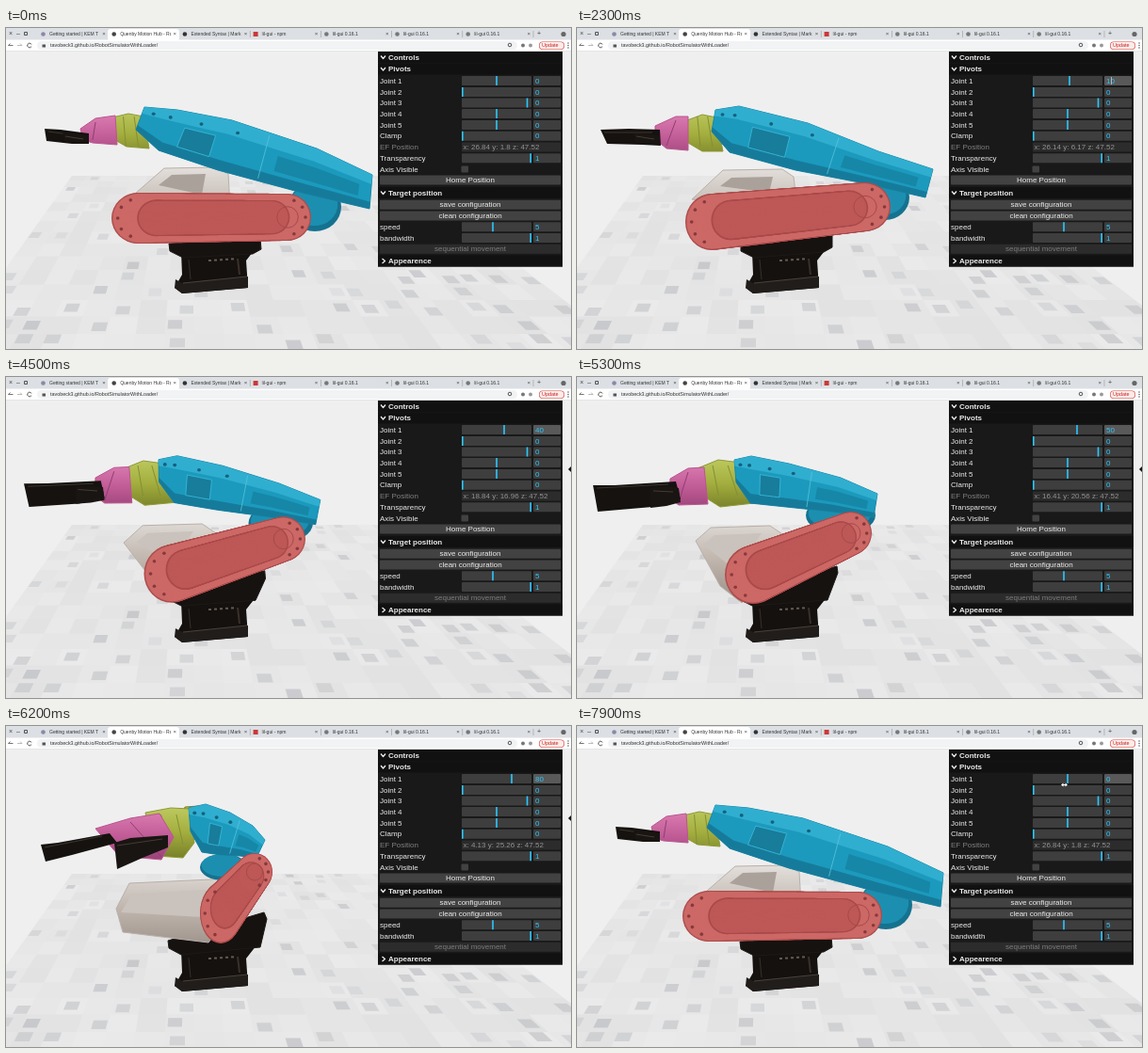
An HTML page with a canvas for the animation above (8 s loop, 600x341 px).

```html
<!DOCTYPE html>
<html lang="en">
<head>
<meta charset="utf-8">
<title>Robot arm simulator</title>
<style>
html, body { margin: 0; width: 100%; height: 100%; overflow: hidden; background: #efefef; }
canvas { display: block; }
</style>
</head>
<body>
<canvas id="stage" width="600" height="341"></canvas>
<script>
const c = document.getElementById('stage').getContext('2d');
const LOOP = 8000, CYAN = '#2cc9ff';

// joint angle over time: [ms, degrees]
const STEPS = [[0, 0], [1900, 10], [4100, 20], [4300, 30], [4500, 40], [4700, 50],
  [5400, 60], [5500, 70], [5600, 80], [7200, 0]];

// every part is given at these joint angles and blended between them
const ANGLES = [0, 10, 50, 80];
const POSES = {
  effector: [[26.84, 1.8], [26.14, 6.17], [16.41, 20.56], [4.13, 25.26]],
  turntable: [
    [173,229, 270,224, 271,235, 262,240, 188,244, 174,237],
    [174,227, 271,220, 271,233, 262,238, 188,244, 174,237],
    [174,228, 276,201, 277,208, 266,237, 186,243, 174,237],
    [172,228, 274,198, 277,205, 270,235, 186,243, 173,236]],
  motor: [
    [130,182, 168,149, 222,148, 236,155, 238,190, 180,190],
    [122,182, 155,151, 218,150, 230,158, 234,190, 160,190],
    [126,174, 142,160, 205,158, 230,175, 175,240, 152,222],
    [117,194, 131,167, 240,162, 245,190, 215,230, 124,219]],
  pocket: [
    [162,167, 176,156, 212,155, 208,177],
    [152,168, 164,159, 208,158, 204,175],
    [134,178, 146,168, 196,166, 168,205],
    [122,198, 134,178, 215,174, 208,203]],
  elbow: [[328,190,28,26], [327,180,26,24], [280,147,37,20], [231,150,25,14]],
  arm: [
    [147,84, 182,87, 240,98, 330,128, 389,156, 386,192, 318,176, 225,151, 162,130, 138,108],
    [147,87, 172,83, 245,101, 320,131, 378,150, 370,180, 305,165, 232,151, 162,132, 143,110],
    [167,88, 185,84, 225,92, 280,107, 319,124, 315,149, 270,143, 222,138, 184,134, 169,112],
    [194,87, 212,83, 238,92, 262,106, 275,121, 266,140, 248,138, 228,137, 208,134, 196,112]],
  link: [
    [140,202,28,27, 299,201,25,25],
    [143,206,28,30, 306,190,27,26],
    [187,210,30,31, 291,166,22,23],
    [228,199,22,32, 264,155,19,20]],
  wrist: [
    [113,95, 130,91, 146,94, 152,128, 128,126, 114,118],
    [117,98, 133,92, 148,95, 155,131, 133,131, 118,122],
    [128,97, 150,88, 174,91, 188,134, 152,138, 130,124],
    [148,92, 175,87, 195,88, 200,124, 188,140, 160,138]],
  collar: [
    [180,95, 196,91, 211,96, 208,101],
    [190,96, 198,91, 212,97, 209,103],
    [165,98, 172,87, 186,88, 183,96],
    [186,96, 190,86, 204,85, 200,96]],
  hand: [
    [79,107, 95,96, 116,93, 118,124, 92,122, 82,119],
    [83,104, 105,94, 118,94, 118,130, 95,128, 83,118],
    [99,108, 118,97, 135,96, 139,135, 108,136, 98,129],
    [95,109, 132,98, 163,93, 178,118, 165,142, 120,138]],
  finger: [
    [41,107, 58,108, 88,112, 88,123, 70,123, 43,120],
    [25,108, 55,107, 88,108, 89,125, 70,124, 32,123],
    [17,115, 40,115, 105,111, 110,130, 80,138, 22,143],
    [37,126, 55,124, 110,114, 118,124, 70,137, 42,144]],
  thumb: [
    [60,112, 70,112, 88,114, 88,122, 75,122, 62,121],
    [60,112, 70,112, 88,114, 88,124, 75,123, 62,122],
    [78,118, 95,116, 108,118, 110,133, 95,137, 78,139],
    [115,124, 132,119, 172,116, 172,129, 145,140, 118,152]]
};

const lerp = (a, b, k) => a + (b - a) * k;

function blend(keys, angle) {
  let i = 0;
  while (i < ANGLES.length - 2 && angle > ANGLES[i + 1]) i++;
  const k = (angle - ANGLES[i]) / (ANGLES[i + 1] - ANGLES[i]);
  return keys[i].map((v, n) => lerp(v, keys[i + 1][n], k));
}

function rect(x, y, w, h, fill, r = 0) {
  c.fillStyle = fill;
  c.beginPath();
  c.roundRect(x, y, w, h, r);
  c.fill();
}

function oval(x, y, rx, ry, fill) {
  c.fillStyle = fill;
  c.beginPath();
  c.ellipse(x, y, rx, ry, 0, 0, 7);
  c.fill();
}

function shape(p, fill, edge) {
  c.beginPath();
  for (let i = 0; i < p.length; i += 2) c.lineTo(p[i], p[i + 1]);
  c.closePath();
  c.fillStyle = fill;
  c.fill();
  if (edge) {
    c.strokeStyle = edge;
    c.stroke();
  }
}

function line(p, color, width = 1) {
  c.beginPath();
  for (let i = 0; i < p.length; i += 2) c.lineTo(p[i], p[i + 1]);
  c.strokeStyle = color;
  c.lineWidth = width;
  c.stroke();
  c.lineWidth = 1;
}

function text(s, x, y, size, fill, style = '', align = 'left') {
  c.font = `${style} ${size}px "Liberation Sans", Arial, sans-serif`;
  c.textAlign = align;
  c.textBaseline = 'middle';
  c.fillStyle = fill;
  c.fillText(s, x, y);
}

function gradient(y0, y1, ...colors) {
  const g = c.createLinearGradient(0, y0, 0, y1);
  colors.forEach((col, i) => g.addColorStop(i / (colors.length - 1), col));
  return g;
}

function floor() {
  rect(0, 25, 600, 316, '#efefef');
  let seed = 7;
  const rnd = () => (seed = seed * 16807 % 2147483647) / 2147483647;
  const cols = 22, rowY = i => 157 + 5 * i + 0.5 * i * i;
  const at = (u, y) => lerp(70 - 0.716 * (y - 157), 420 + 1.3 * (y - 157), u / cols);
  for (let r = 0; r < 15; r++) {
    for (let i = 0; i < cols; i++) {
      const tile = (a, b, d, e, fill) => {
        const y0 = rowY(r + d), y1 = rowY(r + e);
        shape([at(i + a, y0), y0, at(i + b, y0), y0, at(i + b, y1), y1, at(i + a, y1), y1], fill);
      };
      const v = 226 + rnd() * 9 | 0;
      tile(0, 1.03, 0, 1.05, `rgb(${v},${v},${v + 1})`);
      if (rnd() < 0.3) {
        const a = rnd() * 0.5, d = rnd() * 0.5;
        tile(a, a + 0.5, d, d + 0.5, `rgba(150,152,158,${0.1 + rnd() * 0.25})`);
      }
    }
  }
}

function robot(angle) {
  const p = {};
  for (const name in POSES) p[name] = blend(POSES[name], angle);
  c.lineJoin = 'round';

  // pedestal
  shape([186,238, 266,233, 255,247, 257,276, 187,282, 179,276, 187,262], '#14110f');
  shape([180,267, 187,271, 257,264, 257,276, 187,282, 179,276], '#211d1a');
  line([188,271, 256,264], '#4b4139');
  line([194,246, 196,267], '#383029');
  line([246,245, 248,262], '#3a302a', 2);
  shape(p.turntable, '#151210', '#1d1917');
  for (let i = 0; i < 5; i++) rect(215 + i * 6, 246 - i * 0.4, 3, 2, '#65594f');

  shape(p.motor, gradient(148, 232, '#e3dfdb', '#c3b9b1', '#a0958d'), '#b9b0a9');
  shape(p.pocket, angle < 30 ? '#aaa19b' : '#cac2bc');
  shape(p.collar, '#a7b244', '#7d8530');

  const [ex, ey, erx, ery] = p.elbow;
  oval(ex, ey, erx, ery, '#15728f');
  oval(ex - 1, ey - 2, erx * 0.9, ery * 0.85, '#1c8fb1');

  shape(p.wrist, gradient(88, 138, '#bcc85d', '#a3ae3e', '#7b842b'), '#8f9936');
  for (const k of [0.35, 0.7])
    line([lerp(p.wrist[0], p.wrist[4], k), 94, lerp(p.wrist[10], p.wrist[6], k), 126], '#848e35');

  // upper arm: u runs along it, v from top edge to bottom edge
  const arm = (u, v) => {
    const i = Math.min(3, Math.floor(u)), k = u - i, a = p.arm;
    const pt = n => lerp(lerp(a[2 * i + n], a[18 - 2 * i + n], v),
      lerp(a[2 * i + 2 + n], a[16 - 2 * i + n], v), k);
    return [pt(0), pt(1)];
  };
  const strip = (u0, u1, v0, v1, fill, edge) => {
    const q = [];
    for (let k = 0; k <= 8; k++) q.push(...arm(lerp(u0, u1, k / 8), v0));
    for (let k = 8; k >= 0; k--) q.push(...arm(lerp(u0, u1, k / 8), v1));
    shape(q, fill, edge);
  };
  shape(p.arm, '#1b9abd', '#1787a8');
  strip(0, 4, 0, 0.28, '#30aed0');
  strip(0, 4, 0.8, 1, '#167b9b');
  strip(1.25, 1.8, 0.36, 0.8, '#187c9b', '#36b3d2');
  strip(2.6, 3.8, 0.4, 0.72, '#1787a7');
  line([...arm(2.45, 0.05), ...arm(2.45, 0.95)], '#57c3dc', 0.8);
  for (const u of [0.35, 0.9, 1.5, 2.1]) oval(...arm(u, 0.2), 2, 1.8, '#14617c');

  shape(p.hand, gradient(94, 140, '#d978af', '#c05b96', '#9c4479'), '#b9568f');
  line([p.hand[2], p.hand[3] + 4, p.hand[8], p.hand[9] - 3], '#8f3f70');
  shape(p.finger, '#15120f');
  line([p.finger[0] + 4, p.finger[1] + 3, p.finger[4] - 8, p.finger[5] + 3], '#3c342d');
  shape(p.thumb, '#191512');
  line([p.thumb[0] + 3, p.thumb[1] + 3, p.thumb[4] - 6, p.thumb[5] + 4], '#463b32');

  // lower link
  const [x0, y0, a0, b0, x1, y1, a1, b1] = p.link;
  const capsule = (size, fill, from = 0, to = 1) => {
    for (let i = 0; i <= 100; i++) {
      const k = lerp(from, to, i / 100);
      oval(lerp(x0, x1, k), lerp(y0, y1, k), lerp(a0, a1, k) * size, lerp(b0, b1, k) * size, fill);
    }
  };
  capsule(1, '#ad4c4b');
  capsule(0.95, '#cc6866');
  capsule(0.72, '#a94a49', 0.12, 0.9);
  capsule(0.66, '#bd5857', 0.12, 0.9);
  for (const [x, y, a, b] of [[x0, y0, a0, b0], [x1, y1, a1, b1]]) {
    const dir = x === x0 ? Math.PI : 0;
    for (let i = -2; i <= 2; i++) {
      const t = dir + i * 0.6;
      oval(x + Math.cos(t) * a * 0.76, y + Math.sin(t) * b * 0.76, 1.8, 1.8, '#87393a');
    }
  }
  c.strokeStyle = '#a64a49';
  c.beginPath();
  c.ellipse(x1, y1, a1 * 0.45, b1 * 0.45, 0, 0, 7);
  c.stroke();
}

function browser() {
  rect(0, 0, 600, 13, '#dcdfe3');
  rect(0, 12.5, 600, 12.5, '#fff');
  text('×', 5, 6, 7, '#444', '', 'center');
  text('–', 13, 6, 7, '#444', '', 'center');
  c.strokeStyle = '#555';
  c.strokeRect(19.5, 4.5, 3, 3);
  rect(108, 1, 76, 13, '#fff', 3);
  const tabs = [['Getting started | KEM T', '#8d87a5'], ['Quenby Motion Hub - Ro', '#444'],
    ['Extended Syntax | Mark', '#333'], ['lil-gui - npm', '#cb3837'],
    ['lil-gui 0.16.1', '#777'], ['lil-gui 0.16.1', '#777'], ['lil-gui 0.16.1', '#777']];
  tabs.forEach(([name, color], i) => {
    const x = 46 + i * 75.2;
    if (i === 3) rect(x - 9, 4, 5, 5, color);
    else oval(x - 6.5, 6.5, 2.3, 2.3, color);
    c.save();
    c.beginPath();
    c.rect(x, 0, 54, 13);
    c.clip();
    text(name, x, 6.8, 5, '#333');
    c.restore();
    text('×', x + 58, 6.5, 6, '#444', '', 'center');
    if (i > 1) rect(x + 62.5, 3, 0.6, 7, '#999');
  });
  text('+', 566, 6.5, 7, '#444', '', 'center');
  oval(592, 6.5, 2.6, 2.6, '#666');
  line([7.5,18.5, 2.5,18.5, 4.5,16.5], '#555', 0.8);
  line([12,18.5, 17,18.5, 15,16.5], '#aaa', 0.8);
  c.strokeStyle = '#555';
  c.beginPath();
  c.arc(25, 18.5, 2.3, 0.5, 5.8);
  c.stroke();
  rect(33, 14, 510, 9, '#f1f3f4', 4.5);
  rect(38.5, 17.5, 3.5, 3, '#555');
  text('tavobeck3.github.io/RobotSimulatorWithLoader/', 47, 18.7, 5.4, '#333');
  c.beginPath();
  c.arc(535, 18, 1.8, 0, 7);
  c.stroke();
  oval(549, 18.5, 2, 2, '#777');
  oval(557, 18.5, 2, 2, '#999');
  rect(566, 14.5, 27, 8.5, '#d8483d', 4);
  rect(566.6, 15.1, 25.8, 7.3, '#fdecea', 3.6);
  text('Update', 569, 18.9, 5.4, '#c5221f');
  for (let i = 0; i < 3; i++) oval(597, 16 + i * 2.5, 0.7, 0.7, '#444');
  rect(0, 24, 600, 0.7, '#ddd');
}

function title(name, y, open) {
  rect(395, y - 6, 196, 12, '#111');
  line(open ? [398,y-1.5, 400.5,y+1.5, 403,y-1.5] : [399.5,y-2.5, 402.5,y, 399.5,y+2.5], '#ebebeb', 1.3);
  text(name, 406, y + 0.3, 8, '#ebebeb', 'bold');
}

function button(name, y, off) {
  rect(397, y - 5, 192, 10, off ? '#2c2c2c' : '#424242', 1);
  text(name, 493, y + 0.4, 8, off ? '#7c7c7c' : '#ebebeb', '', 'center');
}

function slider(name, y, x, value, focus) {
  text(name, 397, y + 0.3, 8, '#ebebeb');
  rect(484, y - 5, 74, 10, '#3e3e3e', 1);
  rect(x - 0.8, y - 5, 1.6, 10, CYAN);
  rect(560, y - 5, 29, 10, focus ? '#595959' : '#3e3e3e', 1);
  text(value, 562, y + 0.4, 8, CYAN);
}

function panel(angle, t) {
  rect(395, 25, 196, 228.5, '#191919');
  title('Controls', 31, true);
  title('Pivots', 43.5, true);
  slider('Joint 1', 56, 521 + angle * 0.2, angle, t >= 800);
  slider('Joint 2', 68, 484.8, 0);
  slider('Joint 3', 79.5, 553.5, 0);
  slider('Joint 4', 91, 521, 0);
  slider('Joint 5', 103, 521, 0);
  slider('Clamp', 114.7, 484.8, 0);
  const [x, y] = blend(POSES.effector, angle).map(v => +v.toFixed(2));
  text('EF Position', 397, 126.8, 8, '#808080');
  rect(484, 121.5, 105, 10, '#2c2c2c', 1);
  text(`x: ${x} y: ${y} z: 47.52`, 485.5, 126.8, 8, '#929292');
  slider('Transparency', 138.3, 557.2, 1);
  text('Axis Visible', 397, 150.3, 8, '#ebebeb');
  rect(483.5, 146.5, 7.5, 7, '#424242', 1);
  button('Home Position', 161.6);
  title('Target position', 175, true);
  button('save configuration', 187.8);
  button('clean configuration', 199.5);
  slider('speed', 211.3, 517, 5);
  slider('bandwidth', 223, 557.2, 1);
  button('sequential movement', 234.8, true);
  title('Appearence', 247.5, false);
}

function pointer(t) {
  if (t < 2500) {
    if (t >= 800) line([567.5, 52, 567.5, 60], '#c8c8c8', 0.8);
  } else if (t < 7700) {
    shape([597,98, 600,95, 600,101], '#111');
  } else {
    line([515,62.5, 520,62.5], '#fff', 1.2);
    shape([514,62.5, 516.5,60.5, 516.5,64.5], '#fff');
    shape([521,62.5, 518.5,60.5, 518.5,64.5], '#fff');
  }
}

function draw() {
  const t = performance.now() % LOOP;
  const angle = STEPS.findLast(s => s[0] <= t)[1];
  floor();
  robot(angle);
  browser();
  panel(angle, t);
  pointer(t);
  requestAnimationFrame(draw);
}
draw();
</script>
</body>
</html>
```
